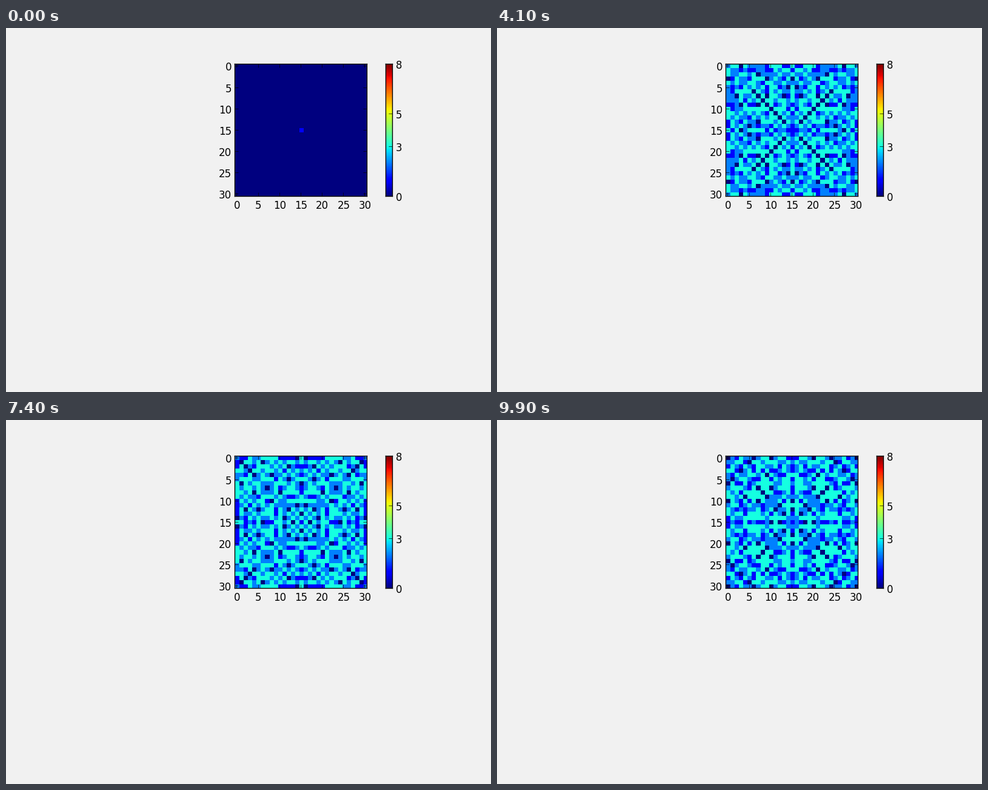
A matplotlib script for the animation above (10000 ms loop, 800 by 600 pixels).

```python
import numpy as np
import matplotlib.pyplot as plt
from matplotlib.animation import FuncAnimation
from matplotlib.transforms import ScaledTranslation

W, H, DPI = 800, 600, 100
SIZE, FRAMES, GRAINS = 31, 100, 100
TOP, BOTTOM = 58.95, 276.95
LEFT, RIGHT = 376.95, 594.95

plt.rcParams.update({
    "font.family": "DejaVu Sans",
    "font.size": 12,
    "xtick.labelsize": 12,
    "ytick.labelsize": 12,
    "axes.linewidth": 1.0,
})


def relax(grid):
    """Topple every cell holding four or more grains; edges lose grains."""
    while True:
        n = grid // 4
        if not n.any():
            return
        grid -= 4 * n
        grid[1:] += n[:-1]
        grid[:-1] += n[1:]
        grid[:, 1:] += n[:, :-1]
        grid[:, :-1] += n[:, 1:]


def sandpile():
    """One grain at the centre, then a fixed batch before each new state."""
    mid = SIZE // 2
    grid = np.zeros((SIZE, SIZE), int)
    grid[mid, mid] = 1
    states = [grid.copy()]
    for _ in range(FRAMES - 1):
        grid[mid, mid] += GRAINS
        relax(grid)
        states.append(grid.copy())
    return states


fig = plt.figure(figsize=(W / DPI, H / DPI), dpi=DPI, facecolor="#f1f1f1")
nudge = ScaledTranslation(0.6 / DPI, -1 / DPI, fig.dpi_scale_trans)


def place(left, right):
    box = [left / W, 1 - BOTTOM / H, (right - left) / W, (BOTTOM - TOP) / H]
    ax = fig.add_axes(box)
    ax.tick_params(direction="in", length=4, width=0.5, pad=4)
    return ax


def shift_labels(*axes):
    for axis in axes:
        for label in axis.get_ticklabels():
            label.set_transform(label.get_transform() + nudge)


def to_cell(px, start):
    return (px - start) * SIZE / (RIGHT - LEFT) - 0.5


states = sandpile()

ax = place(LEFT, RIGHT)
extent = (to_cell(378, LEFT), to_cell(597, LEFT),
          to_cell(278, TOP), to_cell(59, TOP))
image = ax.imshow(states[0], cmap="jet", vmin=0, vmax=8, extent=extent,
                  interpolation="nearest", aspect="auto")
ax.set_xlim(-0.5, SIZE - 0.5)
ax.set_ylim(SIZE - 0.5, -0.5)
ax.set_xticks(range(0, SIZE, 5))
ax.set_yticks(range(0, SIZE, 5))
ax.tick_params(top=True, right=True)
shift_labels(ax.xaxis, ax.yaxis)

bar = place(626, 637)
bar.imshow(np.arange(256)[:, None], cmap="jet", extent=(0, 1, 0, 8),
           origin="lower", interpolation="nearest", aspect="auto")
bar.set_xticks([])
bar.yaxis.tick_right()
bar.set_yticks([0, 3, 5, 8])
shift_labels(bar.yaxis)


def update(i):
    image.set_data(states[i])
    return [image]


anim = FuncAnimation(fig, update, frames=FRAMES, interval=100,
                     repeat=True, blit=False)
plt.show()
```
